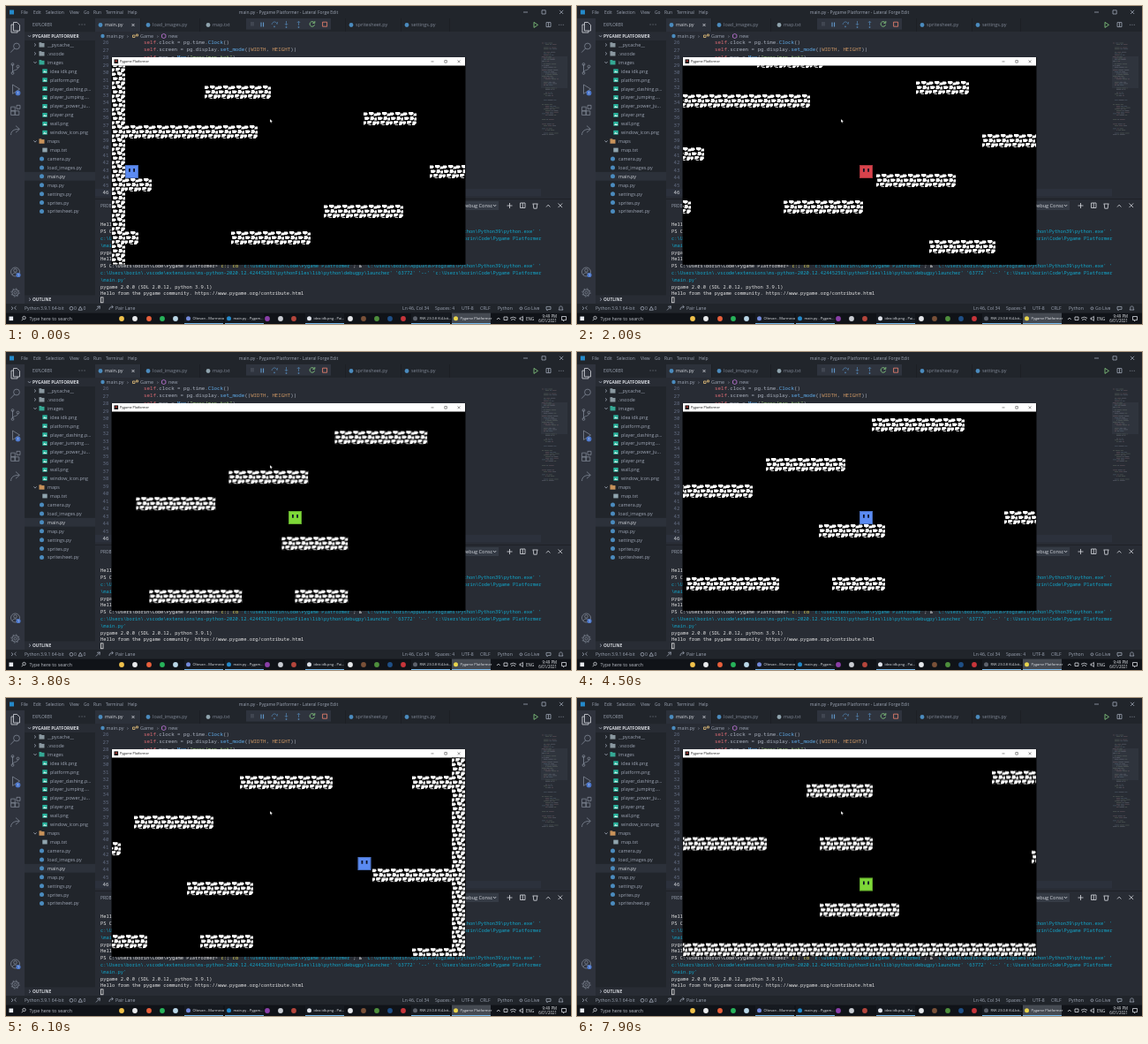
Recreate the animation shown at these times as an HTML page. Size 640 by 360 pixels, loop 8000 ms.

```html
<!DOCTYPE html>
<html lang="en">
<head>
<meta charset="utf-8">
<title>Platformer in an editor</title>
<style>
  html, body { margin: 0; width: 100%; height: 100%; overflow: hidden; background: #282c34; }
  svg { display: block; width: 640px; height: 360px; }
  text { font-family: "Open Sans", "Noto Sans", sans-serif; white-space: pre; }
  .mono { font-family: "Noto Sans Mono", "DejaVu Sans Mono", monospace; }
  .line { fill: none; stroke-width: .8; }
</style>
</head>
<body>
<svg id="stage" viewBox="0 0 640 360" xmlns="http://www.w3.org/2000/svg">
  <defs>
    <pattern id="brick" width="15" height="15" patternUnits="userSpaceOnUse">
      <rect width="15" height="15" fill="#000"/>
      <path fill="#fff" d="M0 .4h3.6l1.4 1.8-2 1.8h-3zM6 0h5l1 2-3 2-3-1.5zM12.6 1.4h2.4v3h-4zM1 5.4h4l2 1.4-2 2.2h-3.6zM8 5h3l1.6 2.4-2 1.8h-3.2zM13 6.2h2v3.2h-3zM0 10.4h3v2.6l-2 1.6h-1zM4.4 10h4.2l1 1.4-2.6 2.2h-3zM10.6 10.4h4l.4 2-2.4 2.6h-2.6zM5.6 14.2h3.4v.8h-3.4z"/>
    </pattern>
    <clipPath id="view"><rect x="120" y="67.5" width="400" height="225"/></clipPath>
  </defs>
  <g id="editor"></g>
  <g id="game">
    <rect x="119.5" y="58" width="401" height="235" fill="#000"/>
    <rect x="120" y="58" width="400" height="9.5" fill="#fff"/>
    <g clip-path="url(#view)">
      <g id="world">
        <g id="tiles"></g>
        <g id="player">
          <rect id="body" width="15" height="15"/>
          <rect x=".5" y=".5" width="14" height="14" fill="none" stroke="#000" stroke-opacity=".22"/>
          <path d="M4 4h1.8v3.8h-1.8zM9.2 4h1.8v3.8h-1.8z" fill="#0c1226"/>
        </g>
      </g>
    </g>
    <path d="M299 128v4l1-.9.7 1.5.7-.3-.6-1.5h1.3z" fill="#fff" stroke="#000" stroke-width=".25"/>
  </g>
</svg>
<script>
const NS = "http://www.w3.org/2000/svg";
const $ = id => document.getElementById(id);
const editor = $("editor"), game = $("game"), tiles = $("tiles");

function add(parent, tag, attrs, content) {
  const el = document.createElementNS(NS, tag);
  for (const key in attrs) el.setAttribute(key, attrs[key]);
  if (content !== undefined) el.textContent = content;
  parent.append(el);
  return el;
}
const box = (x, y, width, height, fill, parent = editor) => add(parent, "rect", { x, y, width, height, fill });
const dot = (cx, cy, r, fill) => add(editor, "circle", { cx, cy, r, fill });
const ring = (cx, cy, r, stroke) => add(editor, "circle", { cx, cy, r, stroke, class: "line" });
const line = (d, stroke = GREY, parent = editor) => add(parent, "path", { d, stroke, class: "line" });
// y is the middle of the text line
const label = (x, y, s, fill = GREY, size = 5.4, attrs = {}, parent = editor) =>
  add(parent, "text", { x, y: y + size * .36, fill, "font-size": size, ...attrs }, s);
const mono = (x, y, s, fill, size = 5.42, anchor = "start") =>
  label(x, y, s, fill, size, { class: "mono", "text-anchor": anchor });

function code(x, y, parts, size) {
  for (const [s, fill] of parts) {
    mono(x, y, s, fill, size);
    x += s.length * size * .6;
  }
}

let seed = 7;
const random = () => (seed = seed * 16807 % 2147483647) / 2147483647;

const GREY = "#9da5b4", DIM = "#7f8795", TEXT = "#abb2bf", PALE = "#d7dae0", BLUE = "#61afef", RED = "#e06c75",
      GREEN = "#98c379", ORANGE = "#d19a66", WHITE = "#e5e5e5", CYAN = "#11a8cd", YELLOW = "#e5d85a", PY = "#4b8bbe";
const BOLD = { "font-weight": 700 }, END = { "text-anchor": "end" };

function drawFrame() {
  box(0, 0, 640, 14, "#21252b");
  box(0, 14, 21, 323, "#2f333d");
  box(21, 14, 80, 323, "#21252b");
  box(101, 14, 539, 15, "#21252b");
  box(101, 14, 51, 15, "#2c313a");
  box(101, 207, 505, 8.5, "#2c313c");
  box(101, 218, 539, .6, "#181a1f");
  box(0, 337, 640, 10.5, "#21252b");

  box(4, 4.5, 5, 5, "#2489ca");
  const menu = { File: 17, Edit: 31, Selection: 45, View: 72, Go: 88, Run: 99, Terminal: 113, Help: 138 };
  for (const name in menu) label(menu[name], 7, name, GREY, 4.9);
  label(320, 7, "main.py - Pygame Platformer - Lateral Forge Edit", GREY, 5, { "text-anchor": "middle" });
  line("M586 7h5M607 4.8h4.2v4.2h-4.2zM627 4.8l4.2 4.2M631.2 4.8l-4.2 4.2");
}

function drawActivity() {
  line("M8.5 18.5h4l3 3v6.5h-7zM8.5 21h-2.5v9h7v-2", PALE);
  ring(12, 45.5, 3.4, DIM);
  line("M9.6 48l-4.4 4.6M7.5 66v9M13.5 69.5c0 4-6 2-6 6", DIM);
  ring(7.5, 66, 1.4, DIM); ring(13.5, 68.5, 1.4, DIM); ring(7.5, 76, 1.4, DIM);
  line("M7.5 89l8 5-8 5.4z", DIM);
  dot(13.5, 98.5, 2.9, "#4d78cc");
  label(12.4, 98.5, "1", "#fff", 3.8);
  line("M5.6 114.2h4.6v4.6h-4.6zM5.6 118.8h4.6v4.6h-4.6zM10.2 118.8h4.6v4.6h-4.6zM12 112.4h4v4h-4z", DIM);
  line("M5.6 146c0-4.6 3.4-6.6 9-6.6M11 135.6l4.4 3.8-4.4 3.8", DIM);
  ring(10.5, 301, 5, DIM); ring(10.5, 299.4, 1.8, DIM);
  line("M7.2 304.6c.6-3.4 6-3.4 6.6 0", DIM);
  dot(14, 304.5, 2.6, "#4d78cc");
  label(12.9, 304.5, "1", "#fff", 3.6);
  ring(10.5, 324.5, 3.6, DIM); ring(10.5, 324.5, 1.5, DIM);
  add(editor, "circle", { cx: 10.5, cy: 324.5, r: 4.6, class: "line", stroke: DIM, "stroke-dasharray": "1.6 2.01" });
}

function drawExplorer() {
  const top = 44, step = 9.92;
  label(30, 21, "EXPLORER", GREY, 4.6);
  line("M82.6 21h.9M85.6 21h.9M88.6 21h.9");
  box(21, 29.2, 80, 9.8, "#282c34");
  line("M25 33.2l1.6 1.8 1.6-1.8");
  label(30, 34, "PYGAME PLATFORMER", PALE, 4.8, BOLD);
  box(21, top + 15 * step - 5, 80, step, "#2c313a");

  const folders = { __pycache__: "#8a98a0", ".vscode": "#8a98a0", images: "#35a894", maps: "#c9935a" };
  const rows = ["/__pycache__", "/.vscode", "/images", " idea idk.png", " platform.png", " player_dashing.p...",
    " player_jumping....", " player_power_ju...", " player.png", " wall.png", " window_icon.png", "/maps", " map.txt",
    "camera.py", "load_images.py", "main.py", "map.py", "settings.py", "sprites.py", "spritesheet.py"];
  rows.forEach((row, i) => {
    const y = top + i * step, name = row.replace(/^[ /]/, "");
    if (row[0] === "/") {
      line(i > 1 ? `M31.4 ${y - .8}l1.6 1.8 1.6-1.8` : `M32 ${y - 1.6}l1.8 1.6-1.8 1.6`);
      box(37.5, y - 2, 6, 4.6, folders[name]);
      box(37.5, y - 2.8, 2.8, 1.2, folders[name]);
      label(47, y, name);
    } else if (row[0] === " ") {
      const image = name !== "map.txt";
      box(41.3, y - 2.4, 5.4, 4.8, image ? "#26b39c" : "#90a4ae");
      if (image) add(editor, "path", { d: `M42 ${y + 1.6}l1.5-2 1 1.2.8-.8 1 1.6z`, fill: "#e4f4f0" });
      label(50, y, name, GREY, 5.35);
    } else {
      dot(40.5, y, 2.5, PY);
      label(47, y, name, name === "main.py" ? PALE : GREY);
    }
  });
  box(21, 327.4, 80, 9.6, "#282c34");
  line("M26 330.6l1.8 1.6-1.8 1.6");
  label(30, 332.3, "OUTLINE", PALE, 4.8, BOLD);
}

function drawToolbar() {
  box(272, 14, 96, 12.6, "#2f343e");
  line("M278 18v4.6M280 18v4.6", "#5c6370");
  line("M289 18.5v5M291.6 18.5v5", "#75beff");
  const steps = "#4f7ba6";
  line("M301 21c1-4 5-4 6-.5l.5-2.5M317.5 17v4.5M315.8 20l1.7 1.8 1.7-1.8M331.5 22v-4.5M329.8 19l1.7-1.8 1.7 1.8", steps);
  for (const [x, y] of [[304, 23.3], [317.5, 24], [331.5, 24]]) dot(x, y, .9, steps);
  line("M349 18.6a2.8 2.8 0 1 0 .6 2.6M349.8 17v2.4h-2.4", "#89d185");
  line("M358.6 18.2h5v5h-5z", "#f48771");
  line("M598 18.4l4.5 3-4.5 3z", "#89d185");
  line("M612 18.6h5v5h-5zM614.5 18.6v5M626 21.3h.9M628.4 21.3h.9M630.8 21.3h.9");
}

function drawEditor() {
  const tabs = { "main.py": 112, "load_images.py": 166, "map.txt": 234, "spritesheet.py": 396, "settings.py": 459 };
  for (const name in tabs) {
    const x = tabs[name];
    dot(x - 5, 21.5, 2.4, name === "map.txt" ? "#90a4ae" : PY);
    label(x, 21.5, name, x === 112 ? PALE : DIM, 5.5);
  }
  line("M142.5 20l3 3M145.5 20l-3 3", PALE);
  for (const x of [152, 219, 384, 447, 502]) box(x, 14, .5, 15, "#181a1f");
  drawToolbar();

  dot(109.5, 34, 2.2, PY);
  label(113.5, 34, "main.py");
  label(137, 34, "›", GREY, 6);
  line("M143.5 33h2.5v2.5h-2.5zM147.5 32h2v2h-2z", "#e5c07b");
  label(152, 34, "Game");
  label(171, 34, "›", GREY, 6);
  line("M176.5 32.5l2.2-1 2.2 1v3l-2.2 1-2.2-1z", "#c678dd");
  label(184, 34, "new");

  for (let n = 26; n <= 46; n++) mono(109.6, 41 + (n - 26) * 8.5, n, n === 46 ? PALE : "#636d83", 5.77);
  const self = ["self", RED], plain = s => [s, TEXT];
  code(156, 41, [self, plain(".clock = pg.time."), ["Clock", BLUE], plain("()")], 5.77);
  code(156, 49.3, [self, plain(".screen = pg.display."), ["set_mode", BLUE], plain("(("), ["WIDTH", ORANGE], plain(", "),
    ["HEIGHT", ORANGE], plain("))")], 5.77);
  code(156, 57.6, [self, plain(".map = "), ["Map", BLUE], plain("("), ['"maps/map.txt"', GREEN], plain(")")], 5.77);
  drawMinimap();
}

function drawMinimap() {
  const inks = ["#8b92a0", "#6d8296", "#94747c", "#7c8a78"];
  box(606, 57, 30, 36, "rgba(120,130,150,.09)");
  for (let y = 40; y < 146; y += 1.7) {
    if (random() < .18) continue;
    let x = 607 + Math.floor(random() * 3) * 2;
    for (let k = 0; k < 3; k++) {
      const w = 1 + random() * 5;
      box(x, y, w, .6, inks[Math.floor(random() * 4)]).setAttribute("opacity", .5);
      x += w + .8;
    }
  }
}

function drawTerminal() {
  label(107, 226, "PROBLEMS", GREY, 4.8);
  box(505, 221, 53, 10, "#353b45");
  label(517, 226, "Debug Consc", PALE, 5.6);
  line("M552 225l1.6 1.8 1.6-1.8M567.5 226h6M570.5 223v6M582.5 223h5.5v5.5h-5.5zM585.2 223v5.5M596.5 224h6M597.2 224l.6 5.2h3.4l.6-5.2M612 227.5l2.2-2.4 2.2 2.4M625.5 223.5l4.6 4.6M630.1 223.5l-4.6 4.6", PALE);

  const home = String.raw`c:\Users\borin`, project = home + String.raw`\Code\Pygame Platformer`;
  const prompt = "PS C" + project.slice(1) + "> ";
  const launcher = home + String.raw`\.vscode\extensions\ms-python-2020.12.424452561\pythonFiles\lib\python\debugpy\launcher' '63772' '--' '` + project;
  const hello = "Hello from the pygame community. https://www.pygame.org/contribute.html";
  const version = "pygame 2.0.0 (SDL 2.0.12, python 3.9.1)";
  const python = String.raw`\Programs\Python\Python39\python.exe' '`;

  mono(107, 247, hello, WHITE);
  for (const y of [255, 294]) {
    code(107, y, [[prompt, WHITE], ["c:", YELLOW], ["; ", WHITE], ["cd ", YELLOW], [`'${project}'`, CYAN],
      ["; & ", WHITE], [`'C${home.slice(1)}\\AppData`, CYAN]], 5.42);
    mono(606, y, python, CYAN, 5.42, "end");
    mono(107, y + 7.9, launcher, CYAN);
    mono(107, y + 15.8, "\\main.py'", CYAN);
    mono(107, y + 23.6, version, WHITE);
    mono(107, y + 31.3, hello, WHITE);
  }
  add(editor, "rect", { x: 107.4, y: 329.8, width: 2.6, height: 6, class: "line", stroke: WHITE });
}

function drawStatus() {
  label(21, 342.3, "Python 3.9.1 64-bit", GREY, 5.1);
  line("M6 340.4l2 1.8-2 1.8M11.5 340l-2 1.8 2 1.8");
  ring(74, 342.3, 1.9, GREY);
  label(77, 342.3, "0", GREY, 5);
  line("M82 344.2l2.2-4 2.2 4z");
  label(87.5, 342.3, "0", GREY, 5);
  line("M102 344.4l4-4.2M103 340.4l3.4-.6-.4 3.4M117 344c0-3 1.6-3.4 4-3.4M119.6 339l1.8 1.6-1.8 1.6");
  label(124, 342.3, "Pair Lane", GREY, 5.2);
  const items = { "Ln 46, Col 34": 449, "Spaces: 4": 486, "UTF-8": 516, "CRLF": 537, "Python": 557, "Go Live": 587 };
  for (const s in items) label(items[s], 342.3, s, GREY, 5.1);
  ring(583.4, 342.3, 1.4, GREY);
  line("M612 340.4h5v3h-3l-1 1.4v-1.4h-1zM626 344h5l-.8-1.2v-1.4c0-2-3.4-2-3.4 0v1.4z");
}

function drawTaskbar() {
  box(0, 347.5, 640, 12.5, "#101318");
  box(3.5, 351.5, 4.6, 4.6, "#e8ebf0");
  ring(20.5, 353, 1.7, PALE);
  line("M19.3 354.4l-1.6 1.8", PALE);
  label(26.5, 354, "Type here to search", "#b8bcc4", 5.3);

  const tasks = [[202, "Oltevan - Murmeco", "#7289da"], [248, "main.py - Pygam...", "#2489ca"],
    [339, "idea idk.png - Pai...", "#dfe3ea"], [459, "RVK 23.0.8 (64-bit...", "#5c616b"],
    [505, "Pygame Platformer", "#e8d44d"]];
  for (const [x, s, fill] of tasks) {
    box(x, 347.5, 44, 12.5, x === 505 ? "#454a52" : "#161a20");
    box(x, 359, 44, 1, "#76b9ed");
    dot(x + 4.5, 353.8, 2.5, fill);
    label(x + 9.5, 353.8, s, "#e4e7eb", 4);
  }
  const icons = [[131, "#f0c14b"], [146, "#e9eaec"], [162, "#e8603c"], [177, "#27b35a"], [192, "#b9d6e6"],
    [296, "#8a3fa8"], [311, "#c9ccd2"], [326, "#b5463c"], [390, "#e5e7ea"], [405, "#7a5138"], [420, "#4e8f3c"],
    [435, "#1f4f86"], [450, "#c7353a"]];
  for (const [x, fill] of icons) dot(x, 354, 2.9, fill);

  line("M556 355l1.8-2 1.8 2M564 352h4v3.5h-4zM572 355.5a4 4 0 0 1 5 0M571 353.4a6 6 0 0 1 7 0M582 353h1.4l2-1.6v5l-2-1.6h-1.4z", PALE);
  label(589, 354, "ENG", "#e4e7eb", 4.6);
  label(624, 351, "9:49 PM", "#e4e7eb", 4.4, END);
  label(624, 356.8, "6/01/2021", "#e4e7eb", 4.4, END);
  line("M629.5 351.5h5v4h-2l-1 1.4v-1.4h-2z", PALE);
}

function drawWindow() {
  box(122.5, 60.4, 4.6, 4.6, "#111", game);
  box(123.6, 61.6, 2.4, 1.2, "#d9443f", game);
  label(129, 62.8, "Pygame Platformer", "#111", 3.7, {}, game);
  line("M481.5 62.9h3M496.8 61.5h2.6v2.6h-2.6zM511.6 61.4l2.8 2.8M514.4 61.4l-2.8 2.8", "#777", game)
    .setAttribute("stroke-width", .5);
}

// platforms: left, right, top
const PLATFORMS = [
  [225, 300, 90], [405, 465, 120], [135, 285, 135], [480, 585, 180], [675, 720, 180], [135, 165, 195],
  [360, 450, 225], [135, 150, 255], [255, 345, 255], [630, 720, 285], [420, 495, 300], [270, 375, 360],
  [435, 495, 360], [675, 720, 375], [150, 225, 405], [435, 525, 435], [120, 735, 480]
];
function drawWorld() {
  for (const [left, right, top] of PLATFORMS) box(left, top, right - left, 15, "url(#brick)", tiles);
  for (const x of [120, 720]) box(x, -60, 15, 555, "url(#brick)", tiles);
}

const WALK = "#5b8bf2", JUMP = "#7ed838", DASH = "#d8434c";
// time, x, y, arc height until the next key, colour
const PATH = [
  [0, 135, 180, 0, WALK], [200, 138, 180, 0, WALK], [350, 150, 180, 40, JUMP], [850, 270, 240, 0, WALK],
  [1450, 300, 240, 45, DASH], [2000, 341, 215, 15, DASH], [2560, 345, 345, 0, WALK], [2750, 356, 345, 0, WALK],
  [3150, 356, 345, 0, WALK], [3250, 360, 345, 45, JUMP], [3900, 440, 285, 0, WALK], [4200, 466, 285, 0, WALK],
  [4520, 466, 285, 40, JUMP], [5400, 660, 240, 2, JUMP], [5580, 668, 270, 0, WALK], [5800, 668, 270, 0, WALK],
  [6050, 615, 270, 49, WALK], [6550, 600, 465, 0, WALK], [6650, 604, 465, 0, WALK], [6850, 604, 465, 0, WALK],
  [7300, 550, 465, 35, JUMP], [7900, 480, 406, 0, JUMP], [8000, 470, 418, 0, JUMP]
];
const LOOP = 8000, STEP = 100;
const clamp = (v, lo, hi) => Math.min(hi, Math.max(lo, v));

function pose(t) {
  let i = PATH.length - 2;
  while (PATH[i][0] > t) i--;
  const [t0, x0, y0, arc, colour] = PATH[i], [t1, x1, y1] = PATH[i + 1];
  const u = (t - t0) / (t1 - t0);
  return { x: x0 + (x1 - x0) * u, y: y0 + (y1 - y0) * u - 4 * arc * u * (1 - u), colour };
}

function draw(now) {
  const t = Math.floor(now % LOOP / STEP) * STEP;
  const { x, y, colour } = pose(t);
  const camX = clamp(x - 320, 0, 215), camY = Math.min(y - 180, 202.5);
  $("world").setAttribute("transform", `translate(${-camX} ${-camY})`);
  $("player").setAttribute("transform", `translate(${x} ${y})`);
  $("body").setAttribute("fill", colour);
}

drawFrame(); drawActivity(); drawExplorer(); drawEditor(); drawTerminal(); drawStatus(); drawTaskbar();
drawWindow(); drawWorld();

const start = performance.now();
function tick() {
  draw(performance.now() - start);
  requestAnimationFrame(tick);
}
tick();
</script>
</body>
</html>
```
